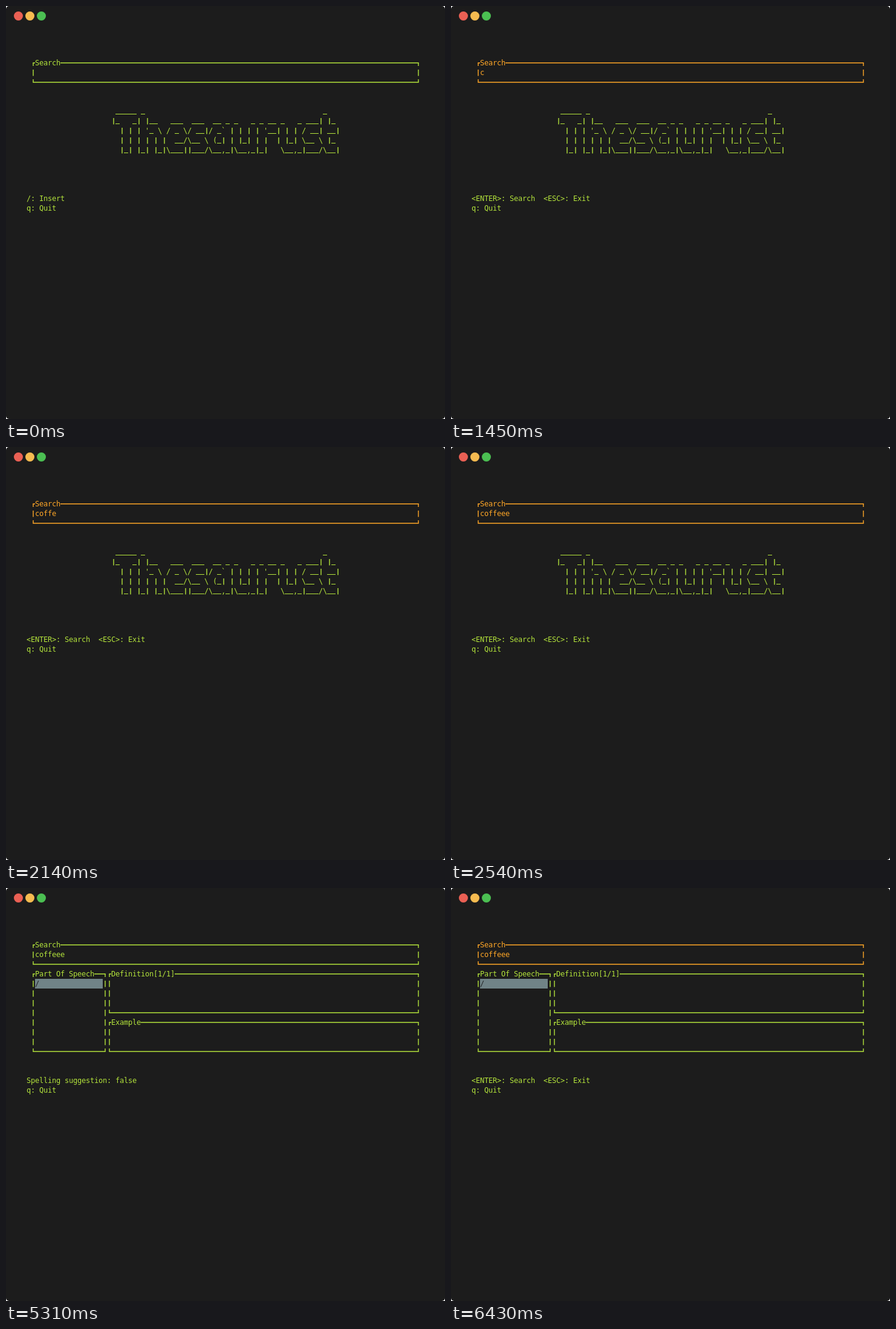
These frames come from a looping animation (726x682 px, 8000 ms). An HTML page with a canvas:

```html
<!DOCTYPE html>
<html lang="en">
<head>
<meta charset="utf-8">
<title>Terminal thesaurus</title>
<style>
  html, body { margin: 0; width: 100%; height: 100%; overflow: hidden; background: #fff; }
  canvas { display: block; }
</style>
</head>
<body>
<canvas id="stage" width="726" height="682"></canvas>
<script>
const ctx = document.getElementById("stage").getContext("2d");
const LOOP = 8000;
const CELL_W = 7, CELL_H = 16, LEFT = 34, TOP = 86;
const GREEN = "#b3e33b", ORANGE = "#ffa727", GREY = "#708387", BLACK = "#232628";

const BANNER = String.raw`
 _____ _                                          _
|_   _| |__   ___  ___  __ _ _   _ _ __ _   _ ___| |_
  | | | '_ \ / _ \/ __|/ _~ | | | | '__| | | / __| __|
  | | | | | |  __/\__ \ (_| | |_| | |  | |_| \__ \ |_
  |_| |_| |_|\___||___/\__,_|\__,_|_|   \__,_|___/\__|`.replace("~", "`").split("\n").slice(1);

const QUERY = "coffeee";
const KEY_TIMES = [1450, 1530, 1690, 1880, 2140, 2340, 2540];

const INSERT_HINT = "<ENTER>: Search  <ESC>: Exit";
const HINTS = [
  [0, "/: Insert"],
  [960, INSERT_HINT],
  [3670, "l, h: Change definition  /: Insert"],
  [5310, "Spelling suggestion: false"],
  [5900, "Spelling suggestion: true"],
  [6430, INSERT_HINT],
];

// Line characters as [x, y, width, height] strokes inside one cell
const ACROSS = [0, 7.2, 7, 1.5], RIGHT_HALF = [3.3, 7.2, 3.7, 1.5], LEFT_HALF = [0, 7.2, 4.7, 1.5];
const UPPER = [3.3, 3, 1.4, 5], LOWER = [3.3, 8, 1.4, 5], UPRIGHT = [3.3, 3, 1.4, 10.5];
const STROKES = {
  "─": [ACROSS], "│": [UPRIGHT], "|": [UPRIGHT], "_": [[0, 12, 7, 1]],
  "┌": [RIGHT_HALF, LOWER], "┐": [LEFT_HALF, LOWER],
  "└": [RIGHT_HALF, UPPER], "┘": [LEFT_HALF, UPPER],
};

function put(col, row, text, color = GREEN) {
  ctx.fillStyle = color;
  [...text].forEach((ch, i) => {
    const x = LEFT + (col + i) * CELL_W, y = TOP + row * CELL_H;
    if (STROKES[ch]) STROKES[ch].forEach(([dx, dy, w, h]) => ctx.fillRect(x + dx, y + dy, w, h));
    else ctx.fillText(ch, x, y + 12);
  });
}

function box(title, left, right, top, bottom, color) {
  const inner = right - left - 1;
  put(left, top, "┌" + title.padEnd(inner, "─") + "┐", color);
  for (let row = top + 1; row < bottom; row++) {
    put(left, row, "│", color);
    put(right, row, "│", color);
  }
  put(left, bottom, "└" + "─".repeat(inner) + "┘", color);
}

function drawWindow() {
  ctx.clearRect(0, 0, 726, 682);
  ctx.fillStyle = "#1c1c1c";
  ctx.beginPath();
  ctx.roundRect(0, 0, 726, 682, 5);
  ctx.fill();
  ["#ea6054", "#f6bb50", "#4bbf52"].forEach((color, i) => {
    ctx.fillStyle = color;
    ctx.beginPath();
    ctx.arc(20.5 + 19 * i, 16.5, 7.5, 0, 2 * Math.PI);
    ctx.fill();
  });
}

function drawResults() {
  box("Part Of Speech", 1, 18, 3, 11);
  box("Definition[1/1]", 19, 92, 3, 7);
  box("Example", 19, 92, 8, 11);
  ctx.fillStyle = GREY;
  ctx.fillRect(LEFT + 2 * CELL_W, TOP + 4 * CELL_H, 16 * CELL_W, CELL_H);
  put(2, 4, "/", BLACK);
}

function draw(t) {
  const hint = HINTS.findLast(([start]) => t >= start)[1];
  const searchColor = hint === INSERT_HINT ? ORANGE : GREEN;
  const typed = KEY_TIMES.filter(time => t >= time).length;

  drawWindow();
  ctx.font = '12px "DejaVu Sans Mono", monospace';
  box("Search", 1, 92, 0, 2, searchColor);
  put(2, 1, QUERY.slice(0, typed), searchColor);
  if (t < 3670) BANNER.forEach((line, i) => put(20, 5 + i, line));
  else drawResults();
  put(0, 14, hint);
  put(0, 15, "q: Quit");
}

function tick() {
  draw(performance.now() % LOOP);
  requestAnimationFrame(tick);
}
tick();
</script>
</body>
</html>
```
